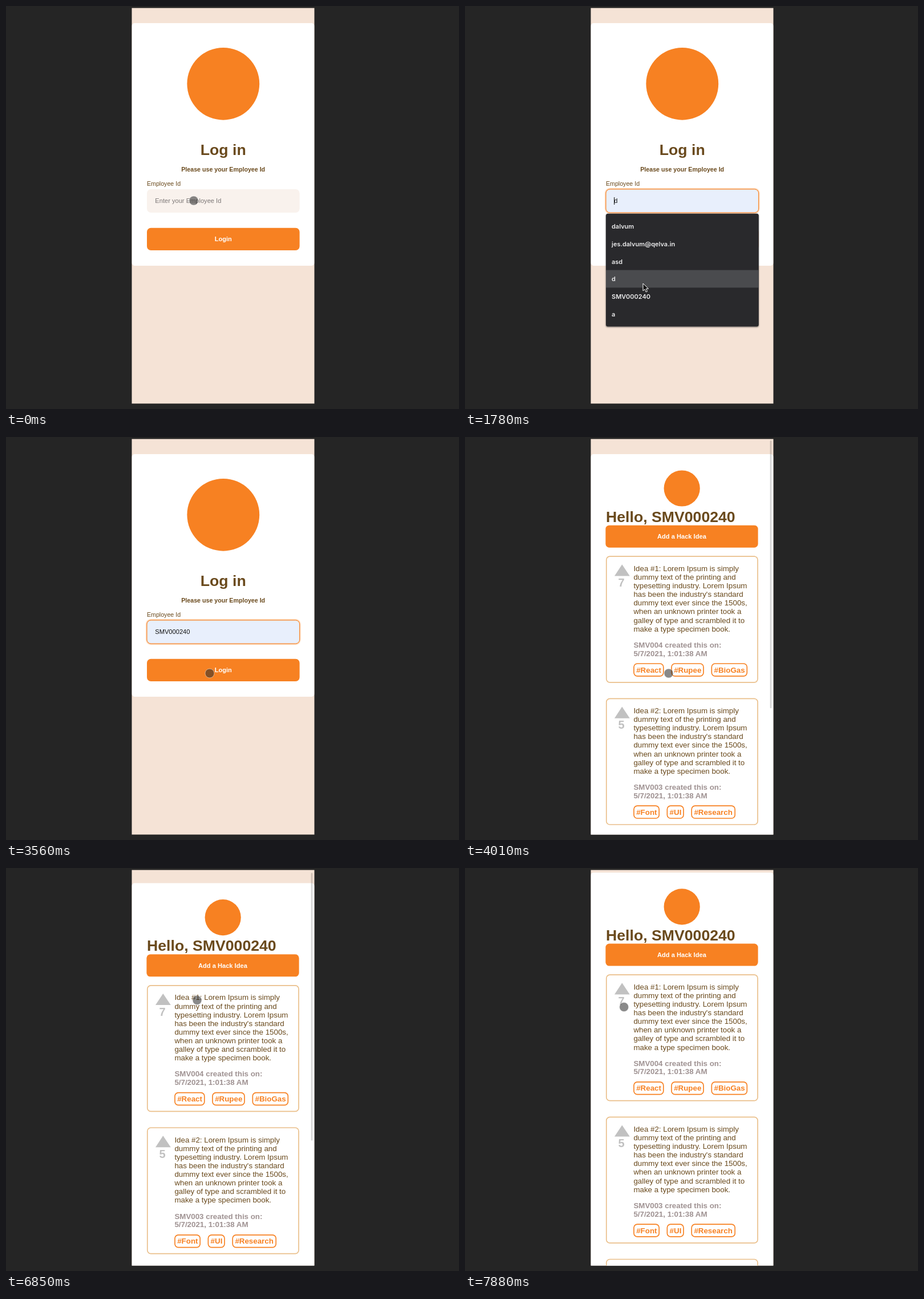
These frames come from a looping animation (794 px wide and 706 px high, 8 s). An HTML page:

```html
<!DOCTYPE html>
<html lang="en">
<head>
<meta charset="utf-8">
<title>Log in and browse ideas</title>
<style>
  html, body { margin: 0; width: 100%; height: 100%; overflow: hidden; background: #252525; }
  svg { display: block; font-family: "Liberation Sans", Arial, sans-serif; fill: #6a4a1d; }
  .bold { font-weight: 700; }
  .mid { text-anchor: middle; }
  .h1 { font-size: 26.67px; }
  .body { font-size: 13.33px; }
  .small { font-size: 10.67px; }
  .ui { font-size: 11.11px; }
  .white { fill: #fff; }
  .orange { fill: #f78122; }
  .line { fill: #fff; stroke: #eabf8a; stroke-width: 1.67; }
  .tag { fill: #fff; stroke: #f78122; stroke-width: 1.67; }
  .meta { fill: #9f9292; }
  .vote { fill: #c1c1c1; font-size: 20px; }
  #menu { font: 600 11px Inter, "Open Sans", sans-serif; fill: #ececed; }
</style>
</head>
<body>
<svg width="794" height="706" viewBox="0 0 794 706">
  <defs>
    <clipPath id="screen"><rect x="220.5" y="3.5" width="320" height="693"/></clipPath>
    <filter id="soft" x="-10%" y="-30%" width="120%" height="160%"><feGaussianBlur stdDeviation="1.3"/></filter>
  </defs>
  <rect width="794" height="706" fill="#252525"/>
  <g clip-path="url(#screen)">
    <rect x="220" y="3" width="321" height="694" fill="#f5e3d6"/>

    <g id="login">
      <rect class="white" x="220.5" y="30" width="320" height="425" rx="5"/>
      <circle class="orange" cx="380.8" cy="136.3" r="63.4"/>
      <text class="bold mid h1" x="380.7" y="260.5">Log in</text>
      <text class="bold mid small" x="380.7" y="289.6">Please use your Employee Id</text>
      <text class="small" x="246.9" y="315">Employee Id</text>
      <rect id="glow" x="246" y="320" width="269.5" height="43" rx="8" fill="#f78122" opacity=".75" filter="url(#soft)"/>
      <rect id="field" x="247" y="321" width="267.6" height="41" rx="7"/>
      <text id="value" class="ui" x="261.3" y="345"></text>
      <rect id="caret" y="335" width="1" height="13" fill="#000"/>
      <rect class="orange" x="247" y="388.8" width="267.6" height="39.2" rx="7"/>
      <text class="bold mid ui white" x="380.8" y="412.4">Login</text>
    </g>

    <g id="home">
      <g id="scroll">
        <rect class="white" x="220.5" y="30" width="320" height="1000" rx="5"/>
        <circle class="orange" cx="380.2" cy="90" r="31.6"/>
        <text class="bold h1" x="247" y="148.8">Hello, SMV000240</text>
        <rect class="orange" x="246.4" y="154.7" width="267.2" height="39" rx="6.5"/>
        <text class="bold mid ui white" x="379.9" y="178.4">Add a Hack Idea</text>
        <g id="cards"></g>
      </g>
      <rect id="thumb" x="534.6" width="2.8" height="469" rx="1.4" fill="#000"/>
    </g>

    <g id="menu"></g>
    <circle id="dot" r="8" fill="#282828" fill-opacity=".55" stroke="#fff" stroke-opacity=".45"/>
    <path id="arrow" d="M0 0V13L3.1 10.2 5.2 15 7.5 14 5.4 9.3H9.5Z" fill="#111" stroke="#fff" stroke-width="1"/>
  </g>
</svg>
<script>
const $ = id => document.getElementById(id);
const show = (el, on) => el.style.display = on ? '' : 'none';
const text = (x, y, cls, s) => `<text x="${x}" y="${y}" class="${cls}">${s}</text>`;
const rect = (x, y, w, h, r, attrs) =>
  `<rect x="${x}" y="${y}" width="${w}" height="${h}" rx="${r}" ${attrs}/>`;

const LOREM = ['Lorem Ipsum is simply', 'dummy text of the printing and',
  'typesetting industry. Lorem Ipsum', "has been the industry's standard",
  'dummy text ever since the 1500s,', 'when an unknown printer took a',
  'galley of type and scrambled it to', 'make a type specimen book.'];

// tags: [label, x, width]
function card(n, votes, author, tags) {
  const lines = LOREM.map((s, i) =>
    text(295.4, 234.8 + i * 15.12, 'body', i ? s : `Idea #${n}: ${s}`)).join('');
  const chips = tags.map(([s, x, w]) =>
    rect(x, 397, w, 21.8, 6, 'class="tag"') + text(x + 4.2, 412.6, 'body bold orange', s)).join('');
  return `<g transform="translate(0 ${(n - 1) * 249.2})">
    ${rect(247.8, 209.2, 265.2, 220.6, 6, 'class="line"')}
    <path class="vote" d="M275.3 223.3 288.8 243.5H262Z"/>
    ${text(274.1, 262.3, 'vote bold mid', votes)}${lines}
    ${text(295.4, 368.9, 'body bold meta', author + ' created this on:')}
    ${text(295.4, 383.5, 'body bold meta', '5/7/2021, 1:01:38 AM')}${chips}</g>`;
}
$('cards').innerHTML =
  card(1, 7, 'SMV004', [['#React', 296, 51.8], ['#Rupee', 362, 56], ['#BioGas', 432.3, 62]]) +
  card(2, 5, 'SMV003', [['#Font', 296, 44.2], ['#UI', 354.4, 28.6], ['#Research', 397.2, 76]]) +
  card(3, 3, 'SMV002', []);

const ID = 'SMV000240';
const ITEMS = ['dalvum', 'jes.dalvum@qelva.in', 'asd', 'd', ID, 'a'];
$('menu').innerHTML =
  rect(246.5, 364.5, 268.6, 198.5, 4, 'fill="#000" opacity=".4" filter="url(#soft)"') +
  rect(247, 363.8, 267.8, 197.8, 3.5, 'fill="#29292c"') +
  rect(247, 0, 267.8, 30.8, 0, 'id="hover" fill="#4a4b4e"') +
  ITEMS.map((s, i) => text(257, 390 + i * 30.75, '', s)).join('');

// Each step overrides the state left by the one before it.
const STEPS = [
  { t: 0, dot: [329, 341], arrow: null, focus: false, menu: false, hover: -1,
    value: '', caret: false, home: false, scroll: 0, bar: 0 },
  { t: 290, focus: true, caret: true },
  { t: 440, menu: true },
  { t: 880, caret: false },
  { t: 1480, dot: null, arrow: [321, 395], hover: 0, caret: true },
  { t: 1630, arrow: [315, 446], hover: 2 },
  { t: 1780, arrow: [312, 486], hover: 3 },
  { t: 1930, arrow: [311, 502], hover: 4 },
  { t: 2080, arrow: [310, 511] },
  { t: 2230, arrow: [310, 516] },
  { t: 2380, menu: false, hover: -1, value: ID },
  { t: 2520, arrow: null, dot: [310, 516] },
  { t: 2820, dot: [315, 504], caret: false },
  { t: 2970, dot: [334, 464] },
  { t: 3110, dot: [352, 425] },
  { t: 3260, dot: [357, 414], caret: true },
  { t: 3560, caret: false },
  { t: 4010, home: true, bar: 1 },
  { t: 4450, bar: .5 },
  { t: 4600, bar: 0 },
  { t: 6400, dot: [347.5, 371] },
  { t: 6550, dot: [343, 322] },
  { t: 6700, dot: [338, 262] },
  { t: 6850, dot: [335, 231.5], scroll: 3.4, bar: 1 },
  { t: 7000, dot: [333, 226], scroll: 22.1 },
  { t: 7290, dot: [324, 228] },
  { t: 7440, dot: [306, 233] },
  { t: 7590, dot: [291, 239], bar: .5 },
  { t: 7740, dot: [282, 242], bar: 0 },
  { t: 7880, dot: [278.7, 243.5] }
];
let last = {};
const STATES = STEPS.map(s => last = { ...last, ...s });

function place(el, at) {
  show(el, at);
  if (at) el.setAttribute('transform', `translate(${at})`);
}

function draw(s) {
  show($('login'), !s.home);
  show($('home'), s.home);
  show($('menu'), s.menu);
  show($('glow'), s.focus);
  show($('caret'), s.caret);
  show($('hover'), s.hover >= 0);
  $('hover').setAttribute('y', 462.6 + (s.hover - 3) * 30.75);

  const shown = s.hover >= 0 ? ITEMS[s.hover] : s.value;
  $('value').textContent = shown || 'Enter your Employee Id';
  $('value').style.fill = shown ? '#111' : '#7c7776';
  $('field').style.fill = shown ? '#e8effc' : '#f9f2ed';
  $('field').style.stroke = s.focus ? '#f78122' : 'none';
  $('caret').setAttribute('x', s.value ? 322.4 : 261.2);

  $('scroll').setAttribute('transform', `translate(0 ${-s.scroll})`);
  $('thumb').setAttribute('y', 6.3 + s.scroll * .677);
  $('thumb').style.opacity = s.bar * .16;
  place($('dot'), s.dot);
  place($('arrow'), s.arrow);
}

const LOOP = 8000;
let current;
function tick() {
  const t = performance.now() % LOOP;
  const next = STATES.findLast(s => s.t <= t);
  if (next !== current) draw(current = next);
  requestAnimationFrame(tick);
}
tick();
</script>
</body>
</html>
```
